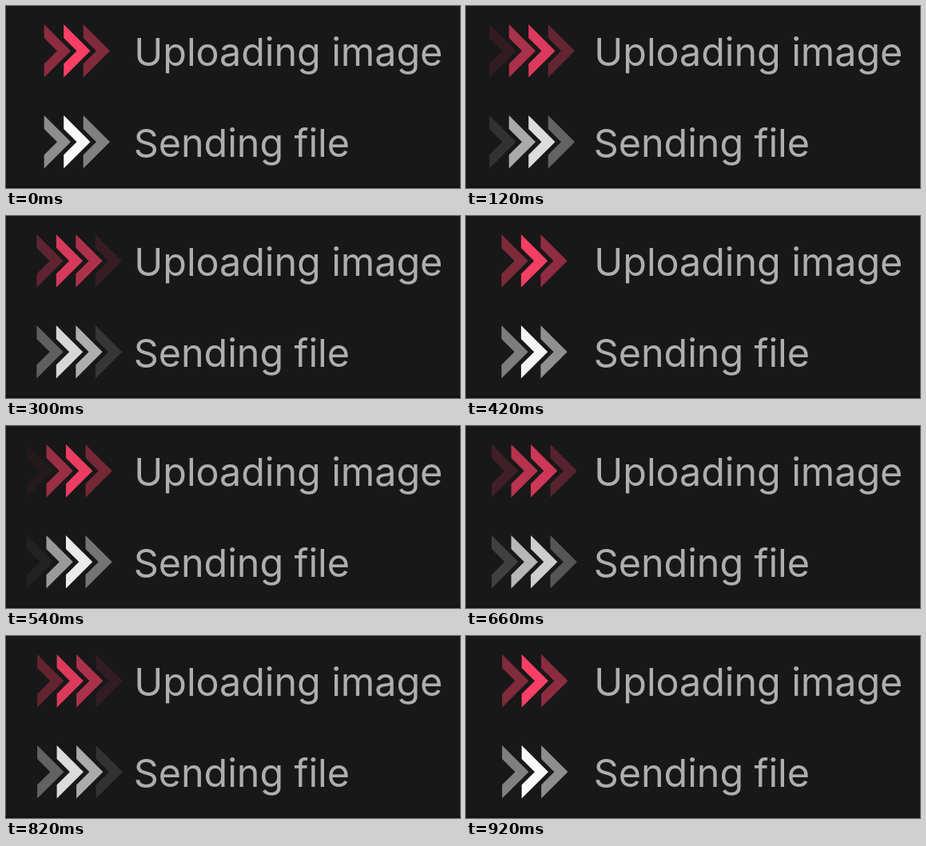
Write an HTML page that moves like this. It is 568 by 228 pixels and loops after 0.94 s.

```html
<!DOCTYPE html>
<html lang="en">
<head>
<meta charset="utf-8">
<title>Progress chevrons</title>
<style>
  html, body { margin: 0; width: 100%; height: 100%; overflow: hidden; background: #181818; }
  svg { display: block; width: 568px; height: 228px; }
  text { font: 400 48.5px Inter, "Open Sans", sans-serif; letter-spacing: -0.09px; fill: #aeaeae; }
</style>
</head>
<body>
<svg viewBox="0 0 568 228">
  <defs>
    <path id="chevron" d="M0 0L33.3 33.2L0 66.4V49.4L16.3 33.2L0 17Z"/>
  </defs>
  <rect width="568" height="228" fill="#181818"/>
  <rect y="225" width="568" height="3" fill="#151215"/>
  <g class="row" transform="translate(0 23)" fill="#ff4068"></g>
  <g class="row" transform="translate(0 137)" fill="#fff"></g>
  <text x="160.3" y="75">Uploading image</text>
  <text x="159.8" y="189">Sending file</text>
</svg>
<script>
  const LOOP = 940, COUNT = 4;
  const START = 23.2, GAP = 24.5, SPEED = 0.0505;
  const PEAK = 71, REACH = 47;
  // The motion advances in uneven steps; each pose holds until the next time.
  const STEPS = [0, 60, 100, 120, 160, 200, 240, 280, 300, 320, 360, 380, 420, 480, 540,
                 600, 660, 720, 780, 800, 840, 860, 900, 920];

  const rows = [...document.querySelectorAll('.row')].map(row =>
    Array.from({ length: COUNT }, () => {
      const mark = document.createElementNS('http://www.w3.org/2000/svg', 'use');
      mark.setAttribute('href', '#chevron');
      return row.appendChild(mark);
    }));

  function draw(now) {
    const time = now % LOOP;
    const held = STEPS.filter(step => step <= time).pop();
    const shift = held * SPEED % GAP;
    for (const marks of rows) {
      marks.forEach((mark, i) => {
        const x = START + shift + i * GAP;
        mark.setAttribute('x', x);
        mark.setAttribute('opacity', Math.max(0, 1 - Math.abs(x - PEAK) / REACH));
      });
    }
  }

  let origin;
  function tick(now) {
    origin ??= now;
    draw(Math.max(0, now - origin));
    requestAnimationFrame(tick);
  }
  draw(0);
  requestAnimationFrame(tick);
</script>
</body>
</html>
```
